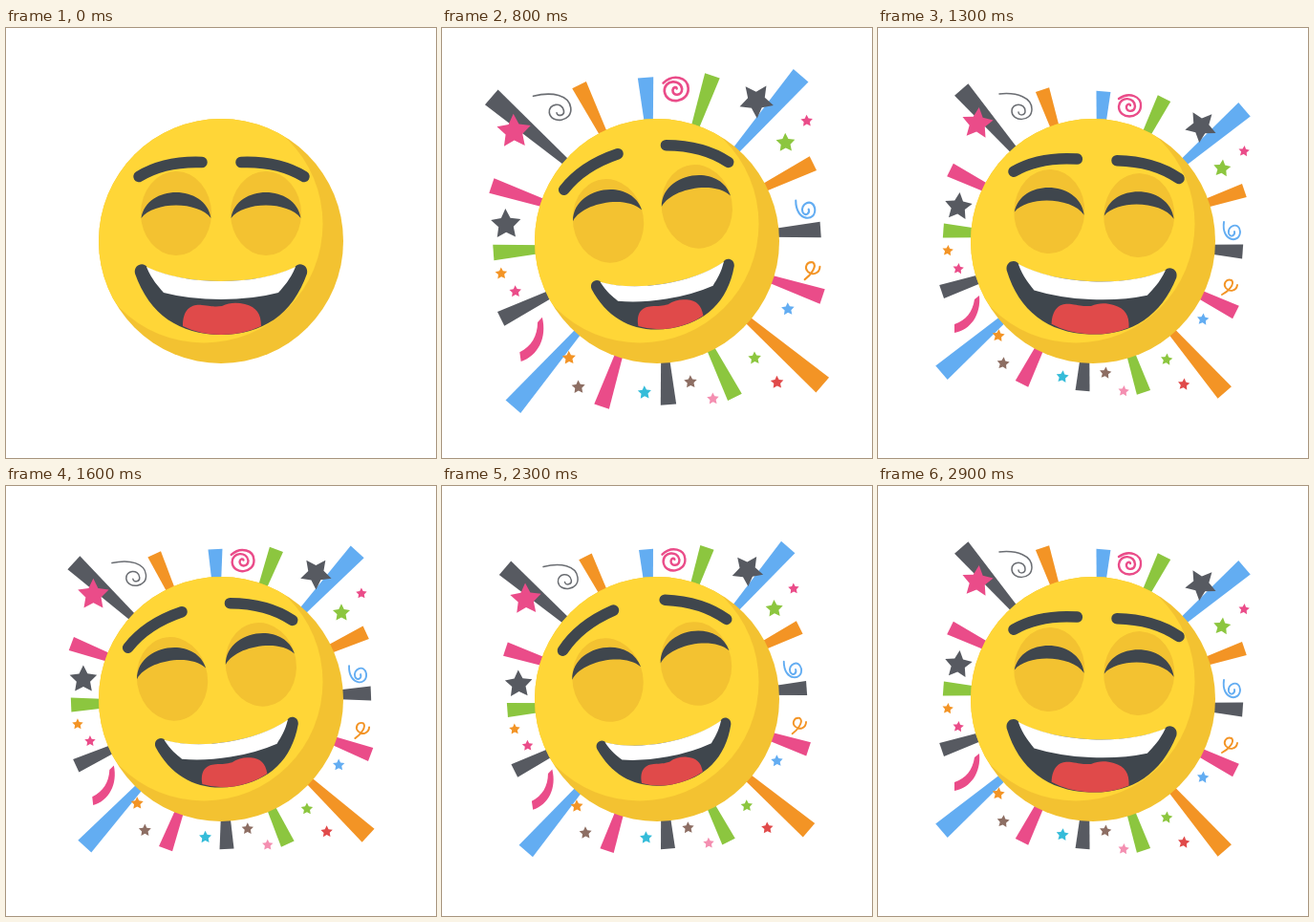
An HTML page that plays this animation: 450 by 450 pixels, repeating every 3000 ms.

```html
<!DOCTYPE html>
<html lang="en">
<head>
<meta charset="utf-8">
<title>Laughing party face</title>
<style>
html, body { margin: 0; width: 100%; height: 100%; overflow: hidden; background: #fff; }
svg { display: block; width: 100%; height: 100%; }
</style>
</head>
<body>
<svg viewBox="0 0 450 450">
  <defs>
    <clipPath id="disc"><circle cx="225" cy="223" r="128"/></clipPath>
    <ellipse id="eye" rx="37" ry="44" fill="#f3c231"/>
    <path id="lid" fill="#3f464d" d="M-36.5 5C-31-31 31-31 36.5 5C23-13-23-13-36.5 5Z"/>
    <path id="brow" fill="none" stroke="#3f464d" stroke-width="11.5" stroke-linecap="round" d="M-33 7.5Q-6-9 33-7.5"/>
  </defs>

  <g id="burst">
    <g id="rays"></g>
    <g id="stars"></g>
    <g fill="none" stroke-linecap="round">
      <path stroke="#6b6e73" stroke-width="1.5" d="M127 69C146 67 161 73 161 85C161 99 140 98 140 87C140 78 154 78 154 87C154 92 147 92 147 88"/>
      <path stroke="#ea4c89" stroke-width="2.4" d="M252 74C263 66 276 72 275 82C274 96 252 96 252 82C253 71 269 72 269 82C268 89 259 88 260 82C261 79 264 79 264 81"/>
      <path stroke="#63adf2" stroke-width="1.9" d="M362 203C359 224 379 226 379 213C378 202 365 207 367 215C369 220 374 217 373 213"/>
      <path stroke="#f39425" stroke-width="1.9" d="M360 279C366 276 374 268 370 264C364 262 361 268 364 272C368 277 375 275 376 269"/>
    </g>
    <path fill="#ea4c89" d="M106 280C108 300 97 316 80 319L80 310C92 306 99 297 101 284Z"/>
  </g>

  <g id="face">
    <circle cx="225" cy="223" r="128" fill="#f3c231"/>
    <circle cx="207" cy="205" r="124.5" fill="#ffd637" clip-path="url(#disc)"/>
    <g id="features">
      <use href="#eye" x="178" y="194"/>
      <use href="#eye" x="272" y="194"/>
      <g id="lids">
        <use href="#lid" x="178" y="194"/>
        <use href="#lid" x="272" y="194"/>
      </g>
      <use id="browL" href="#brow"/>
      <use id="browR" href="#brow"/>
      <g id="mouth">
        <path fill="#3f464d" d="M135 257C133 247 145 244 148 251Q180 265 225 265Q270 265 302 251C305 244 317 247 315 257C300 300 268 321 225 321C182 321 150 300 135 257Z"/>
        <path fill="#fff" d="M147 250Q180 265 225 265Q270 265 303 250C297 264 291 270 285 277Q258 284 225 284Q192 284 165 277C159 270 153 264 147 250Z"/>
        <path fill="#e04a4a" d="M185 312C185 293 195 289 205 290C215 291 218 292 226 291C234 287 242 287 250 289C262 292 267 299 267 312Q248 321 225 321Q203 321 185 312Z"/>
      </g>
    </g>
  </g>
</svg>
<script>
const CX = 225, CY = 223, LOOP = 3000, STEP = 100, SWING = 800;
const C = { black: '#575a61', orange: '#f39425', blue: '#63adf2', green: '#8cc63f', pink: '#ea4c89',
            red: '#e04a4a', brown: '#8d6e63', cyan: '#35bcd9', rose: '#f48fb1' };
const $ = id => document.getElementById(id);
const pose = (id, transform) => $(id).setAttribute('transform', transform);
const around = (x, y, ops) => `translate(${x} ${y}) ${ops} translate(${-x} ${-y})`;

function polygon(parent, points, color) {
  const el = document.createElementNS('http://www.w3.org/2000/svg', 'polygon');
  el.setAttribute('points', points.map(p => p.join()).join(' '));
  el.setAttribute('fill', color);
  parent.append(el);
}

// Sixteen evenly spaced rays that taper towards the middle
const rayColors = 'black orange blue green blue orange black pink orange green black pink blue black green pink';
rayColors.split(' ').forEach((color, i) => {
  const angle = (-131 + 22.5 * i) * Math.PI / 180, c = Math.cos(angle), s = Math.sin(angle);
  const length = [210, 167, 157, 167][i % 4], width = i % 4 ? 15 : 19, inner = 80;
  const at = (r, w) => [CX + r * c - w * s, CY + r * s + w * c];
  const tip = width / 2, base = tip * (inner - 60) / (length - 60);
  polygon($('rays'), [at(length, tip), at(length, -tip), at(inner, -base), at(inner, base)], C[color]);
});

function star(x, y, r, color, turn = 0) {
  const points = Array.from({ length: 10 }, (_, i) => {
    const a = (i * 36 - 84 + turn) * Math.PI / 180, d = i % 2 ? r * .5 : r;
    return [x + d * Math.cos(a), y + d * Math.sin(a)];
  });
  polygon($('stars'), points, C[color]);
}
[[104, 100, 17, 'pink'], [338, 103, 17, 'black', 36], [84, 187, 15, 'black'], [360, 147, 9.5, 'green'],
 [383, 129, 6, 'pink'], [73, 233, 6, 'orange'], [84, 252, 6, 'pink'], [126, 322, 6.8, 'orange'],
 [131, 351, 6.8, 'brown'], [193, 365, 6.8, 'cyan'], [238, 361, 6.5, 'brown'], [257, 380, 6, 'rose'],
 [302, 347, 6.5, 'green'], [320, 373, 6.5, 'red'], [340, 305, 6.5, 'blue']].forEach(s => star(...s));

// Linear interpolation through [time, value] pairs
function keyed(t, keys) {
  if (t <= keys[0][0]) return keys[0][1];
  const i = keys.findIndex(k => k[0] >= t);
  if (i < 0) return keys[keys.length - 1][1];
  const [t0, a] = keys[i - 1], [t1, b] = keys[i];
  return a + (b - a) * (t - t0) / (t1 - t0);
}
const burstSize = [[200, .3], [400, .72], [600, 1.1], [700, 1.13], [800, 1.093], [1100, 1]];
const burstStart = [[400, -.4], [500, 0], [700, -8.2], [800, -8]];
const burstSwing = [[0, -6.2], [300, 4.7], [500, 0], [700, -8.2], [800, -6.2]];

function draw(t) {
  const tilt = Math.sin(2 * Math.PI * Math.max(0, t - 130) / SWING);
  const lift = Math.abs(tilt), bend = tilt * tilt;
  const pop = t > 100 && t < 700 ? 1 + .033 * Math.sin(Math.PI * (t - 100) / 600) : 1;
  const turn = t <= 800 ? keyed(t, burstStart) : keyed(t % SWING, burstSwing);

  pose('burst', around(CX, CY, `rotate(${turn}) scale(${keyed(t, burstSize)})`));
  pose('face', around(CX, CY, `scale(${pop})`));
  pose('features', `rotate(${10.8 * tilt} ${CX} ${CY})`);
  pose('lids', `translate(0 ${-12.5 * lift})`);
  pose('browL', `translate(${172 - 5 * bend} ${148 - 9 * lift}) rotate(${-16 * bend})`);
  pose('browR', `translate(${279 + 3 * bend} ${148 - 10 * lift}) scale(-1 1) rotate(${-16 * bend})`);
  pose('mouth', `translate(0 ${7 * bend}) ` + around(225, 254, `scale(${1 - .22 * bend})`));
}

const start = performance.now();
function tick() {
  const t = (performance.now() - start) % LOOP;
  draw(Math.floor(t / STEP) * STEP);
  requestAnimationFrame(tick);
}
tick();
</script>
</body>
</html>
```
